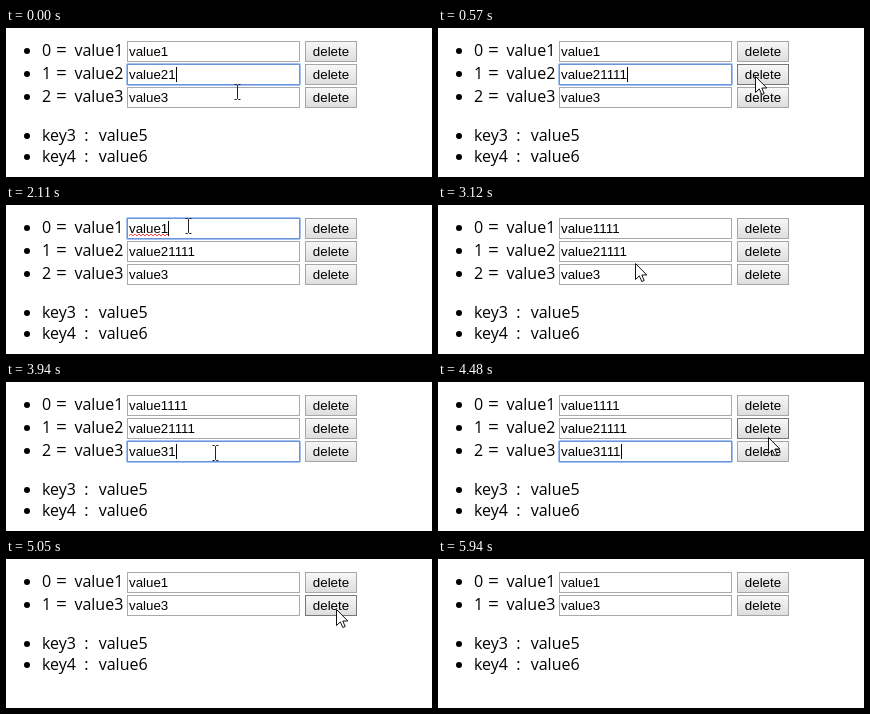
Recreate the animation shown at these times as an HTML page. Size 426 by 149 pixels, loop 6.22 s.

```html
<!DOCTYPE html>
<html lang="en">
<head>
<meta charset="utf-8">
<title>Editable list</title>
<style>
  html, body { margin: 0; width: 100%; height: 100%; overflow: hidden; background: #fff; }
  svg { display: block; }
  .label { font: 16px "Open Sans", "Noto Sans", sans-serif; }
  .equals { font-size: 19px; }
  .field { font: 13.333px "Liberation Sans", Arial, sans-serif; }
  .middle { text-anchor: middle; }
</style>
</head>
<body>
<svg id="stage" width="426" height="149" viewBox="0 0 426 149">
  <defs>
    <linearGradient id="up" x2="0" y2="1">
      <stop stop-color="#f8f8f8"/><stop offset="1" stop-color="#dddddd"/>
    </linearGradient>
    <linearGradient id="down" x2="0" y2="1">
      <stop stop-color="#e4e4e4"/><stop offset="1" stop-color="#f4f4f4"/>
    </linearGradient>
  </defs>
  <g id="page"></g>
  <g id="pointer"></g>
</svg>
<script>
const LOOP = 6220, NONE = -1, PITCH = 23;
const page = document.getElementById('page');
const pointer = document.getElementById('pointer');

// Each step lists only what changes at that time.
const steps = [
  [0, { labels: ['value1', 'value2', 'value3'], values: ['value1', 'value21', 'value3'],
        focus: 1, caret: true, spell: false, hover: NONE, press: NONE, shape: 'beam', at: [231, 64] }],
  [150, { type: [1, 'value211'], at: [256, 63] }],
  [280, { type: [1, 'value2111'], at: [282, 59] }],
  [430, { type: [1, 'value21111'], shape: 'arrow', hover: 1, at: [300, 47] }],
  [570, { at: [317, 48] }],
  [700, { at: [312, 46] }],
  [830, { at: [309, 44] }],
  [980, { caret: false }],
  [1410, { caret: true }],
  [1530, { shape: 'beam', hover: NONE, at: [231, 27] }],
  [1680, { at: [167, 15] }],
  [1960, { caret: false, at: [182, 21] }],
  [2110, { focus: 0, caret: true, spell: true }],
  [2230, { at: [188, 34] }],
  [2380, { type: [0, 'value11'], spell: false, at: [201, 65] }],
  [2530, { type: [0, 'value111'], at: [201, 66] }],
  [2680, { type: [0, 'value1111'] }],
  [2970, { at: [200, 60] }],
  [3120, { focus: NONE, shape: 'arrow', at: [197, 58] }],
  [3400, { shape: 'beam', at: [209, 71] }],
  [3540, { focus: 2 }],
  [3660, { spell: true }],
  [3940, { type: [2, 'value31'], spell: false }],
  [4090, { shape: 'arrow', at: [307, 68] }],
  [4240, { type: [2, 'value311'], hover: 2, at: [318, 62] }],
  [4360, { type: [2, 'value3111'], at: [326, 57], hover: 1 }],
  [4480, { at: [330, 55] }],
  [4630, { at: [330, 53] }],
  [4780, { focus: NONE, press: 1 }],
  [4900, { press: NONE, at: [330, 50] }],
  [5050, { labels: ['value1', 'value3'], values: ['value1', 'value3'] }],
  [5510, { hover: NONE, at: [346, 88] }],
  [5630, { at: [354, 123] }],
  [5780, { at: [359, 148] }],
  [5940, { shape: 'none' }]
];

const states = [];
for (const [time, { type, ...change }] of steps) {
  const state = { ...states[states.length - 1], ...change, time };
  if (type) {
    state.values = [...state.values];
    state.values[type[0]] = type[1];
  }
  states.push(state);
}

const shapes = {
  none: '',
  beam: `<path d="M-3 -7.5H-1L0 -6.5L1 -7.5H3M0 -6.5V6.5M-3 7.5H-1L0 6.5L1 7.5H3"
    transform="translate(.5)" fill="none" stroke="#222"/>`,
  arrow: `<path d="M.5 .5V16.5L4.3 12.9L6.8 18.5L9.2 17.5L6.8 12H11.8Z"
    fill="#fff" stroke="#111"/>`
};

const bullet = y => `<circle cx="21" cy="${y}" r="3"/>`;

function rowMarkup(state, i) {
  const y = 13 + i * PITCH, base = y + 15;
  const focused = state.focus === i, hovered = state.hover === i;
  const edge = focused ? '#6a94dc' : '#a9a9a9';
  const ring = focused
    ? `<rect x="120.5" y="${y - .5}" width="174" height="22" rx="1" fill="none" stroke="#a3c0f3"/>` : '';
  const squiggle = focused && state.spell
    ? `<path d="M123 ${y + 18}${'l2 -2l2 2'.repeat(10)}" fill="none" stroke="#f33" stroke-width=".9"/>` : '';
  return `${bullet(y + 10)}
    <text class="label" y="${base}"><tspan x="36">${i}</tspan> <tspan
      class="equals" x="50">=</tspan> <tspan x="68.4">${state.labels[i]}</tspan></text>
    ${ring}<rect x="121.5" y="${y + .5}" width="172" height="20" fill="#fff" stroke="${edge}"/>
    <text class="field" id="value${i}" x="123" y="${base}">${state.values[i]}</text>${squiggle}
    <rect x="299.5" y="${y + .5}" width="51" height="20" stroke="${hovered ? '#777' : '#a6a6a6'}"
      fill="url(#${state.press === i ? 'down' : 'up'})"/>
    <text class="field middle" x="325" y="${base}">delete</text>`;
}

function pairMarkup(key, value, base) {
  return `${bullet(base - 5)}<text class="label" y="${base}"><tspan x="36">${key}</tspan
    ><tspan class="middle" x="80.5">:</tspan><tspan x="92.7">${value}</tspan></text>`;
}

function draw(state) {
  const count = state.values.length, base = 44 + count * PITCH;
  page.innerHTML = state.values.map((_, i) => rowMarkup(state, i)).join('')
    + pairMarkup('key3', 'value5', base) + pairMarkup('key4', 'value6', base + 21);
  if (state.focus !== NONE && state.caret) {
    const width = document.getElementById('value' + state.focus).getComputedTextLength();
    page.insertAdjacentHTML('beforeend',
      `<rect x="${Math.round(123 + width)}" y="${16 + state.focus * PITCH}" width="1" height="15"/>`);
  }
  pointer.innerHTML = shapes[state.shape];
  pointer.setAttribute('transform', `translate(${state.at})`);
}

let shown;
const start = performance.now();
function tick() {
  const time = (performance.now() - start) % LOOP;
  const state = states.findLast(s => s.time <= time) || states[0];
  if (state !== shown) draw(shown = state);
  requestAnimationFrame(tick);
}
tick();
</script>
</body>
</html>
```
